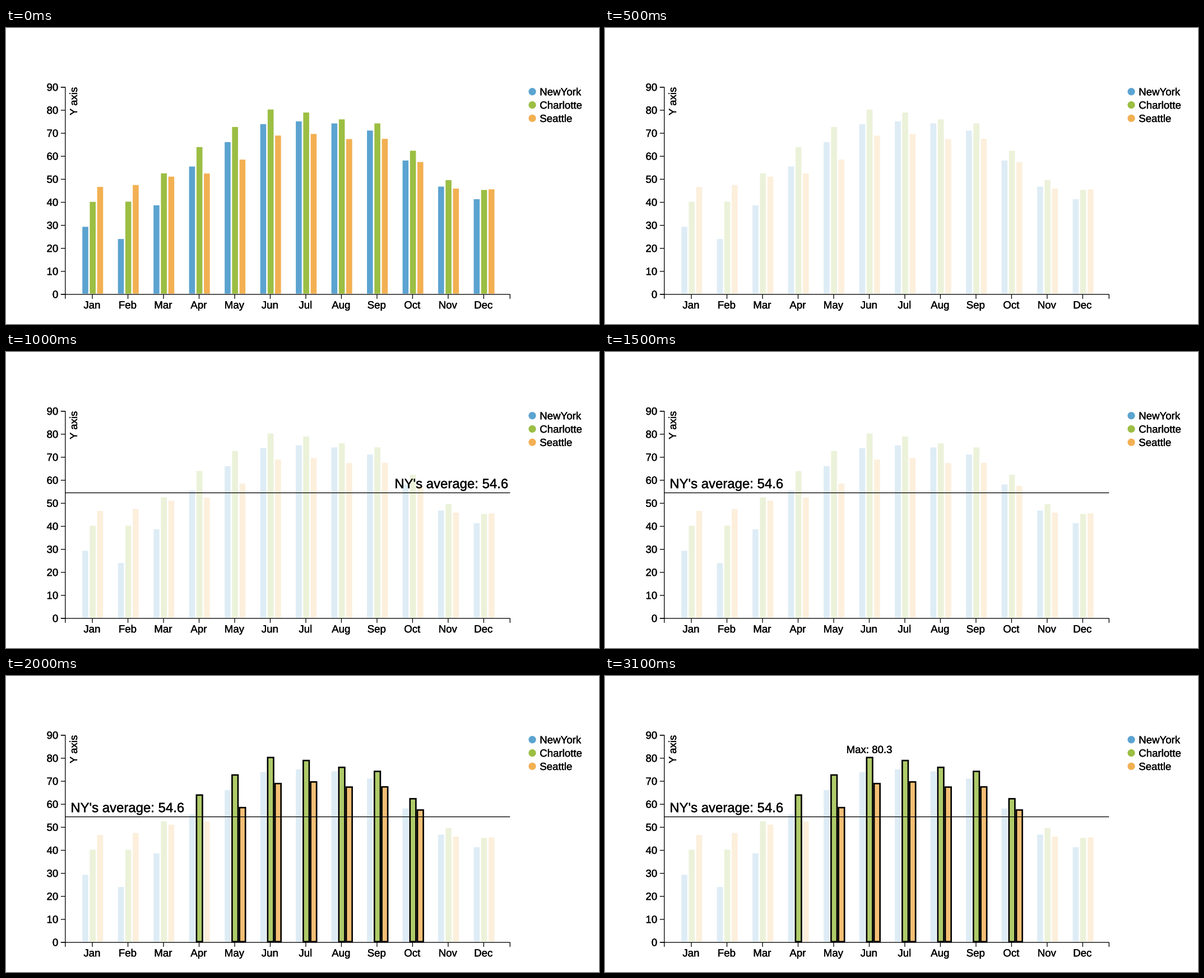
Write a matplotlib script that moves like this. It is 1058x529 px and loops after 3.5 s.

```python
import matplotlib.pyplot as plt
import numpy as np
from matplotlib.animation import FuncAnimation
from matplotlib.patches import Circle, Rectangle
from matplotlib.patheffects import withStroke

plt.rcParams.update({
    "font.family": "Liberation Sans",
    "text.hinting": "none",
    "path.snap": False,
    "toolbar": "None",
})

# The layout is an 800 x 400 drawing scaled to 1058 x 529 pixels.
W, H, DPI = 1058, 529, 100
PT = W / 800 * 72 / DPI
LEFT, RIGHT, TOP, BOTTOM = 80, 680, 80, 360
STEP, BAR_STEP, BAR_W, FIRST_BAR = 48, 10, 8, 103
SMALL, LARGE = 14.1, 18.1

MONTHS = "Jan Feb Mar Apr May Jun Jul Aug Sep Oct Nov Dec".split()


def seasons(mean, cos1, sin1, cos2, sin2, sin3):
    """Monthly temperatures: a yearly wave with a few overtones."""
    t = 2 * np.pi * np.arange(12) / 12
    return (mean + cos1 * np.cos(t) + sin1 * np.sin(t)
            + cos2 * np.cos(2 * t) + sin2 * np.sin(2 * t)
            + sin3 * np.sin(3 * t) + np.cos(3 * t) - 2 * np.sin(4 * t))


SERIES = {
    "NewYork": ("#5ba3d0", seasons(54.56, -23.9, -3.8, -2.3, -2.9, -2.5)),
    "Charlotte": ("#9bbe43", seasons(61.4, -20.4, 0.4, -1.8, -0.7, -0.4)),
    "Seattle": ("#f2b052", seasons(56.6, -12.5, -1.1, 1.6, 2.1, 1.4)),
}
average = SERIES["NewYork"][1].mean()

fig = plt.figure(figsize=(W / DPI, H / DPI), dpi=DPI, facecolor="white")
ax = fig.add_axes([0, 0, 1, 1])
ax.set(xlim=(0, 800), ylim=(400, 0))
ax.axis("off")


def y_of(value):
    return BOTTOM - value * (BOTTOM - TOP) / 90


def line(xs, ys, **kw):
    return ax.plot(xs, ys, color="black", lw=PT, solid_capstyle="butt",
                   solid_joinstyle="miter", snap=False, **kw)[0]


def label(x, y, text, size=SMALL, **kw):
    weight = withStroke(linewidth=0.25, foreground="black")
    return ax.text(x, y, text, fontsize=size * PT, color="black",
                   va="baseline", zorder=6, path_effects=[weight], **kw)


def draw_axes():
    line([LEFT - 6, LEFT, LEFT, LEFT - 6], [TOP, TOP, BOTTOM, BOTTOM], zorder=4)
    line([LEFT, LEFT, RIGHT, RIGHT],
         [BOTTOM + 6, BOTTOM, BOTTOM, BOTTOM + 6], zorder=4)
    for v in range(0, 91, 10):
        y = y_of(v)
        line([LEFT - 6, LEFT], [y, y], zorder=4)
        label(LEFT - 9.5, y + 4.8, str(v), ha="right")
    for i, month in enumerate(MONTHS):
        x = LEFT + 36.5 + STEP * i
        line([x, x], [BOTTOM, BOTTOM + 6], zorder=4)
        label(x - 0.5, BOTTOM + 19, month, ha="center")
    label(96, TOP, "Y axis", ha="right", rotation=90, rotation_mode="anchor")


def draw_legend():
    for i, (name, (color, _)) in enumerate(SERIES.items()):
        y = 86 + 18 * i
        ax.add_patch(Circle((710, y), 5, fc=color, lw=0))
        label(720, y + 5, name)


def draw_bars():
    bars = []
    for j, (name, (color, values)) in enumerate(SERIES.items()):
        for i, v in enumerate(values):
            x, y = FIRST_BAR + STEP * i + BAR_STEP * j, y_of(v)
            bar = Rectangle((x, y), BAR_W, BOTTOM - 1 - y, lw=0,
                            joinstyle="miter", snap=False, zorder=2)
            ax.add_patch(bar)
            bars.append((bar, color, name != "NewYork" and v > average))
    return bars


draw_axes()
draw_legend()
bars = draw_bars()

y_avg = y_of(average)
avg_line = line([LEFT, RIGHT], [y_avg, y_avg], zorder=5)
avg_text = label(0, y_avg - 6.3, f"NY's average: {average:.1f}", LARGE)

charlotte = SERIES["Charlotte"][1]
peak = charlotte.max()
peak_x = FIRST_BAR + STEP * charlotte.argmax() + BAR_STEP + BAR_W / 2
max_text = label(peak_x - 0.5, y_of(peak) - 6, f"Max: {peak:.1f}", ha="center")


def style_bar(bar, color, above, step):
    outlined = above and step >= 4
    alpha = 1 if step == 0 else 0.8 if outlined else 0.2
    bar.set_facecolor((color, alpha))
    bar.set_edgecolor("black" if outlined else "none")
    bar.set_linewidth(2 * PT if outlined else 0)


def update(step):
    for bar, color, above in bars:
        style_bar(bar, color, above, step)
    avg_line.set_visible(step >= 2)
    avg_text.set_visible(step >= 2)
    avg_text.set_x(524.2 if step == 2 else 87.2)
    max_text.set_visible(step >= 5)
    return []


anim = FuncAnimation(fig, update, frames=7, interval=500,
                     init_func=lambda: update(0), repeat=True, repeat_delay=0)
plt.show()
```
